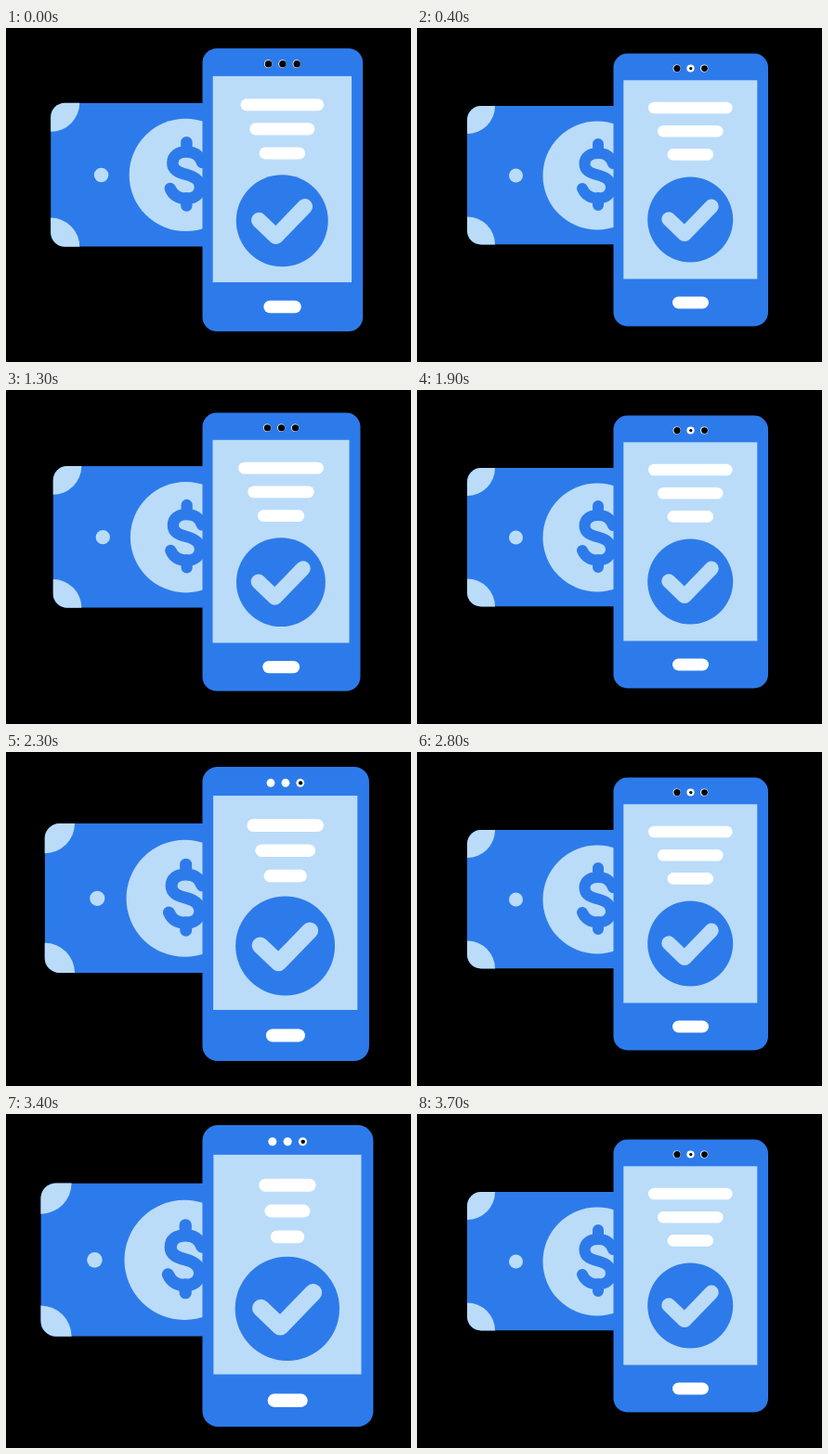
Write an HTML page that moves like this. It is 436x360 px and loops after 3.8 s.

```html
<!DOCTYPE html>
<html lang="en">
<head>
<meta charset="utf-8">
<title>Mobile payment</title>
<style>
  html, body { margin: 0; width: 100%; height: 100%; overflow: hidden; background: #000; }
  svg { display: block; width: 100vw; height: 100vh; }
  .blue { fill: #2d7bea; }
  .light { fill: #badcf9; }
  .white { fill: #fff; }
  .stroke { fill: none; stroke-linecap: round; stroke-linejoin: round; }
</style>
</head>
<body>
<svg viewBox="0 0 436 360">
  <clipPath id="note"><rect x="54" y="84" width="206" height="149.5" rx="15"/></clipPath>
  <g id="scene">
    <g id="bill">
      <g clip-path="url(#note)">
        <rect class="blue" x="54" y="84" width="206" height="149.5"/>
        <circle class="light" cx="54" cy="84" r="30"/>
        <circle class="light" cx="54" cy="233.5" r="30"/>
        <circle class="light" cx="106.5" cy="159" r="7.5"/>
        <circle class="light" cx="194" cy="159" r="58.5"/>
      </g>
      <path class="stroke" stroke="#2d7bea" stroke-width="12" d="M195 125V135M195 183V191
        M211 146C208 138 203 135 195 135C186 135 180.5 139 180.5 146.5C180.5 154 187 156.5 195 158.5
        C204 161 209 164.5 209 172C209 179 203 183.5 195 183.5C186 183.5 181 180 178 173"/>
    </g>
    <g id="phone">
      <rect class="blue" x="211.5" y="27.5" width="166.5" height="294" rx="15"/>
      <rect class="light" x="222.3" y="56.3" width="144" height="214.2"/>
      <rect class="white" x="275" y="289.5" width="39" height="13" rx="6.5"/>
      <g id="camera"></g>
      <g id="lines" class="stroke" stroke="#fff" stroke-width="12.6"></g>
      <g id="badge">
        <circle class="blue" cx="294.2" cy="206.5" r="46"/>
        <path id="check" class="stroke" stroke="#badcf9" stroke-width="15.5" pathLength="1" d="M271 206L288 222.3L317 192.3"/>
      </g>
    </g>
  </g>
</svg>
<script>
const LOOP = 3800, STEP = 100;
const starts = [-370, 900, 2010, 3200];   // moments the note snaps back behind the phone
const lineLengths = [78, 58, 37];

// Values at 0, 100, 200 ... ms after each snap
const curves = {
  scale: [.986, 1.03, 1.105, 1.075, 1.021, 1],
  open:  [0, .55, 1],
  line:  [.04, .25, .55, .85, .99, 1],
  check: [.44, .75, 1]
};

const $ = id => document.getElementById(id);
const set = (el, attrs) => { for (const k in attrs) el.setAttribute(k, attrs[k]); };
const add = (parent, tag, attrs) => {
  const el = document.createElementNS("http://www.w3.org/2000/svg", tag);
  set(el, attrs);
  return parent.appendChild(el);
};

const lines = lineLengths.map((_, i) => add($("lines"), "line", { y1: 86 + 25.2 * i, y2: 86 + 25.2 * i }));
const lenses = [279.7, 294.5, 309.2].map(cx => {
  add($("camera"), "circle", { cx, cy: 43.5, r: 4.1, fill: "#fff" });
  return add($("camera"), "circle", { cx: cx + .3, cy: 43.6 });
});

function curve(name, ms) {
  const v = curves[name], x = Math.min(ms / 100, v.length - 1), i = Math.floor(x);
  return v[i] + ((v[i + 1] ?? v[i]) - v[i]) * (x - i);
}

const zoom = (x, y, s) => `translate(${x} ${y}) scale(${s}) translate(${-x} ${-y})`;

function draw(t) {
  const ms = t - starts.findLast(s => s <= t);
  const scale = curve("scale", ms), shut = 1 - curve("open", ms);
  set($("scene"), { transform: zoom(212, 174.5, scale) });
  set($("bill"), { transform: `translate(${69 * shut} 0)` });
  set($("phone"), { transform: `translate(${-39.5 * shut} 0)` });
  set($("badge"), { transform: zoom(294.2, 206.5, scale) });
  set($("check"), { "stroke-dasharray": `${curve("check", ms)} 2` });
  lines.forEach((el, i) => {
    const half = lineLengths[i] * curve("line", ms) / 2;
    set(el, { x1: 294.3 - half, x2: 294.3 + half });
  });
  const radii = ms < 330 ? [0, 0, 2] : ms < 480 ? [3.6, 3.6, 3.6] : [3.6, 1.6, 3.4];
  lenses.forEach((el, i) => set(el, { r: radii[i] }));
}

function tick(now) {
  draw(Math.floor(now % LOOP / STEP) * STEP);
  requestAnimationFrame(tick);
}
draw(0);
requestAnimationFrame(tick);
</script>
</body>
</html>
```
